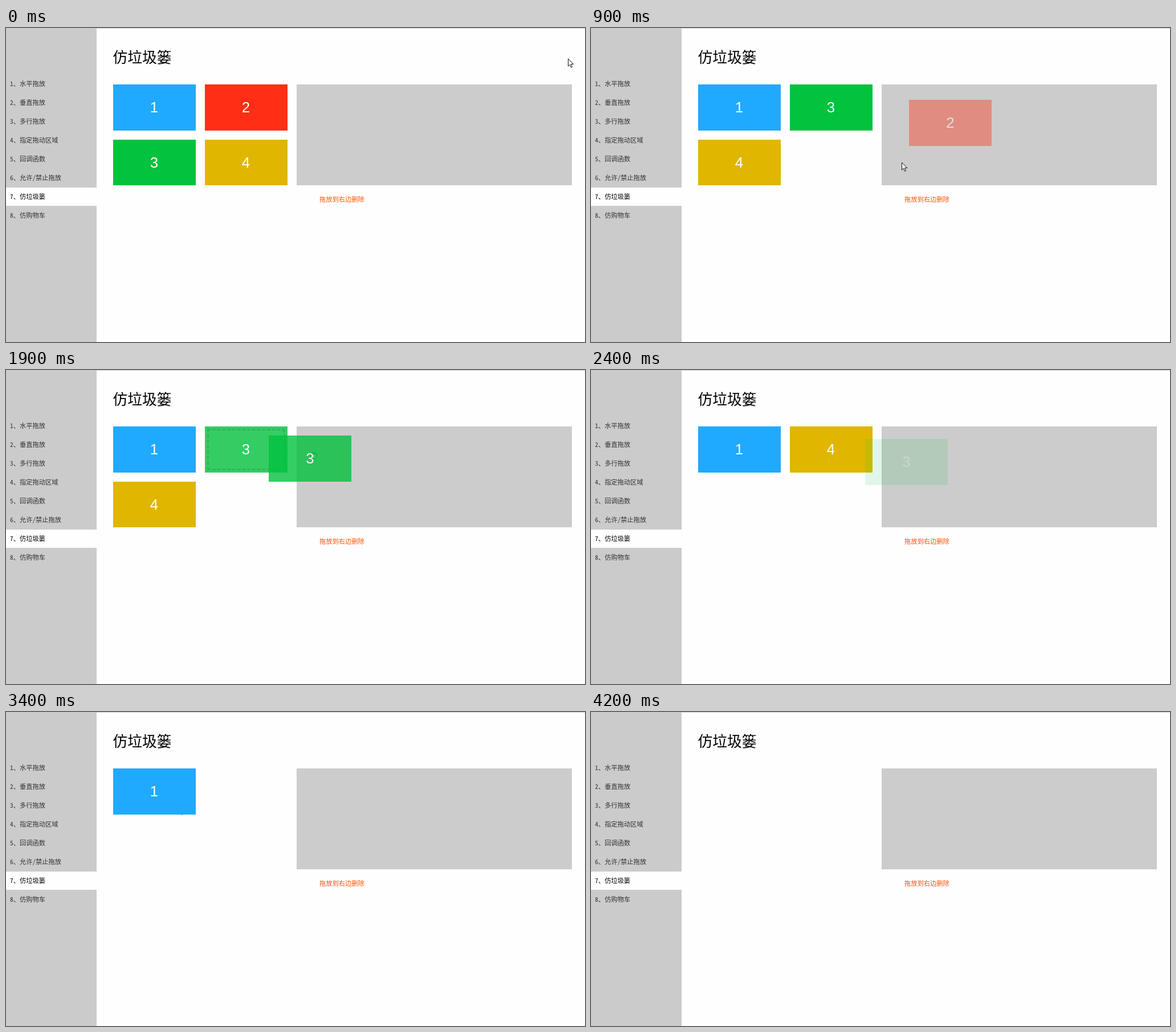
An HTML page for the animation above (5 s loop, 1016 px wide and 551 px high).

```html
<!DOCTYPE html>
<html lang="zh-CN">
<head>
<meta charset="utf-8">
<title>仿垃圾篓</title>
<style>
html, body { margin: 0; width: 100%; height: 100%; overflow: hidden; }
body {
  position: relative;
  background: #fefefe;
  font: 11.27px "Noto Sans Mono CJK SC", "Noto Sans CJK SC", sans-serif;
}
body * { position: absolute; box-sizing: border-box; white-space: nowrap; }
#top { left: 0; top: 0; width: 100%; height: 1px; background: #ccc; }
#menu { left: 0; top: 0; width: 159px; height: 100%; background: #cbcbcb; }
#menu div { left: 0; width: 159px; height: 32px; padding-left: 7px; line-height: 30px; color: #333; }
#menu .on { background: #fefefe; color: #000; }
h1 {
  left: 187.5px; top: 30px; margin: 0;
  font: 400 25.76px/40px "Noto Sans CJK SC", sans-serif; color: #000;
}
#bin { left: 509.5px; top: 99px; width: 483px; height: 177px; background: #ccc; }
#hint { left: 550px; top: 290px; line-height: 20px; color: #ff5500; }
.tile {
  width: 145px; height: 80.5px;
  font: 25.76px/80.5px "Liberation Sans", Arial, sans-serif;
  color: #fff; text-align: center;
}
.held { opacity: .8; }
.held::after {
  content: ""; position: absolute; inset: 4px; box-sizing: border-box;
  border: 3px dashed rgba(0, 0, 0, .16);
}
svg { left: 0; top: 0; width: 1016px; height: 551px; }
svg path { fill: #fff; stroke: #111; stroke-width: 1; stroke-linejoin: round; stroke-linecap: round; }
</style>
</head>
<body>
<div id="top"></div>
<div id="menu"></div>
<h1>仿垃圾篓</h1>
<div id="bin"></div>
<div id="hint">拖放到右边删除</div>
<div id="tiles"></div>
<svg viewBox="0 0 1016 551">
  <g id="arrow">
    <path d="M.5 .5V13L3.4 10.3L5.6 15.3L7.6 14.4L5.4 9.5H9.3Z"/>
  </g>
  <g id="open">
    <path d="M-2.6 6.5L-6.3 1.2Q-7 -.6-5.2-.5L-3.6 1L-5-3.6Q-4.4-5.4-3.2-4.1L-2-1.2L-2.4-5.6Q-1.3-7.2-.3-5.6L.4-1.5L1.2-5.6Q2.4-6.8 3.2-5.2L2.8-1L4.4-3.8Q5.8-4.4 6-2.8L4.8 2.4L3.2 6.5Z"/>
  </g>
  <g id="fist">
    <path d="M-2.8 5.2L-5.2 2Q-6-.4-4.2-1.2Q-4.6-4-2.4-3.9Q-1.2-5.4 .2-4.2Q1.8-5.2 2.8-3.6Q5.2-3.8 5.3-1.2Q5.4 2 3.4 5.2ZM-2.2-3.6V-2M.3-4V-2.2M2.8-3.4V-1.8"/>
  </g>
</svg>
<script>
const LOOP = 5000, STEP = 100, FADE = 400;
const $ = id => document.getElementById(id);

// time, x, y, cursor shape from then on
const path = [
  [0, 986, 54, 'arrow'], [100, 960, 100, 'arrow'], [300, 700, 232, 'arrow'],
  [400, 520, 190, 'arrow'], [500, 416, 140, 'fist'], [600, 626, 167, 'fist'],
  [700, 626, 167, 'fist'], [800, 590, 215, 'arrow'], [900, 545, 236, 'arrow'],
  [1000, 470, 208, 'open'], [1200, 440, 165, 'open'], [1300, 427, 134, 'open'],
  [1400, 427, 134, 'fist'], [1500, 440, 135, 'fist'], [1700, 440, 135, 'fist'],
  [1900, 540, 150, 'fist'], [2100, 560, 156, 'fist'], [2200, 505, 165, 'arrow'],
  [2300, 445, 166, 'open'], [2400, 395.5, 160, 'open'], [2500, 368, 141, 'open'],
  [2600, 365, 141, 'fist'], [2900, 518, 160, 'fist'], [3000, 594, 163.5, 'fist'],
  [3100, 540, 180, 'arrow'], [3300, 350, 180, 'arrow'], [3500, 255, 150, 'open'],
  [3600, 284, 139, 'fist'], [3700, 653, 191.5, 'fist'], [3800, 730, 215, 'arrow'],
  [3900, 830, 227, 'arrow'], [4100, 981, 214, 'arrow'], [4200, 981, 214, 'none']
];

// grab: slot outlined, show: copy follows the cursor, drop: removed; grip: cursor inside the copy
const tiles = [
  { color: '#20aaff', grab: 3600, show: 3700, drop: 3700, grip: [97, 40] },
  { color: '#ff2e14', grab: 500, show: 700, drop: 700, grip: [68, 41] },
  { color: '#02c23e', grab: 1400, show: 1500, drop: 2100, grip: [79, 35] },
  { color: '#e0b600', grab: 2600, show: 2600, drop: 3000, grip: [20, 42.5] }
];

['水平拖放', '垂直拖放', '多行拖放', '指定拖动区域', '回调函数', '允许/禁止拖放', '仿垃圾篓', '仿购物车']
  .forEach((label, i) => {
    const row = document.createElement('div');
    row.textContent = `${i + 1}、${label}`;
    row.style.top = `${82 + 33 * i}px`;
    if (i === 6) row.className = 'on';
    $('menu').append(row);
  });

function makeTile(tile, i, z) {
  const el = document.createElement('div');
  el.className = 'tile';
  el.textContent = i + 1;
  el.style.background = tile.color;
  el.style.zIndex = z;
  $('tiles').append(el);
  return el;
}
tiles.forEach((tile, i) => {
  tile.el = makeTile(tile, i, 1);
  tile.copy = makeTile(tile, i, 2);
});

function cursorAt(t) {
  const last = path.findLastIndex(p => p[0] <= t);
  const [t0, x0, y0, shape] = path[last];
  const [t1, x1, y1] = path[last + 1] || [LOOP, x0, y0];
  const k = (t - t0) / (t1 - t0);
  return { x: x0 + (x1 - x0) * k, y: y0 + (y1 - y0) * k, shape };
}

function place(el, x, y) {
  el.style.left = `${x}px`;
  el.style.top = `${y}px`;
}

function draw(t) {
  const cursor = cursorAt(t);
  let slot = 0;
  for (const { el, copy, grab, show, drop, grip } of tiles) {
    const here = t < drop;
    el.style.display = here ? '' : 'none';
    el.classList.toggle('held', t >= grab);
    if (here) {
      place(el, 187.5 + 161 * (slot % 2), 99 + 96.5 * Math.floor(slot / 2));
      slot++;
    }
    const fade = Math.min(1, Math.max(0, (t - drop) / FADE));
    copy.style.display = t >= show && fade < 1 ? '' : 'none';
    copy.style.opacity = .4 * (1 + Math.cos(Math.PI * fade));
    const at = here ? cursor : cursorAt(drop);
    place(copy, at.x - grip[0], at.y - grip[1]);
  }
  for (const shape of ['arrow', 'open', 'fist']) {
    $(shape).style.display = shape === cursor.shape ? '' : 'none';
    $(shape).setAttribute('transform', `translate(${cursor.x} ${cursor.y})`);
  }
}

const start = performance.now();
function tick() {
  const t = (performance.now() - start) % LOOP;
  draw(Math.floor(t / STEP) * STEP);
  requestAnimationFrame(tick);
}
tick();
</script>
</body>
</html>
```
